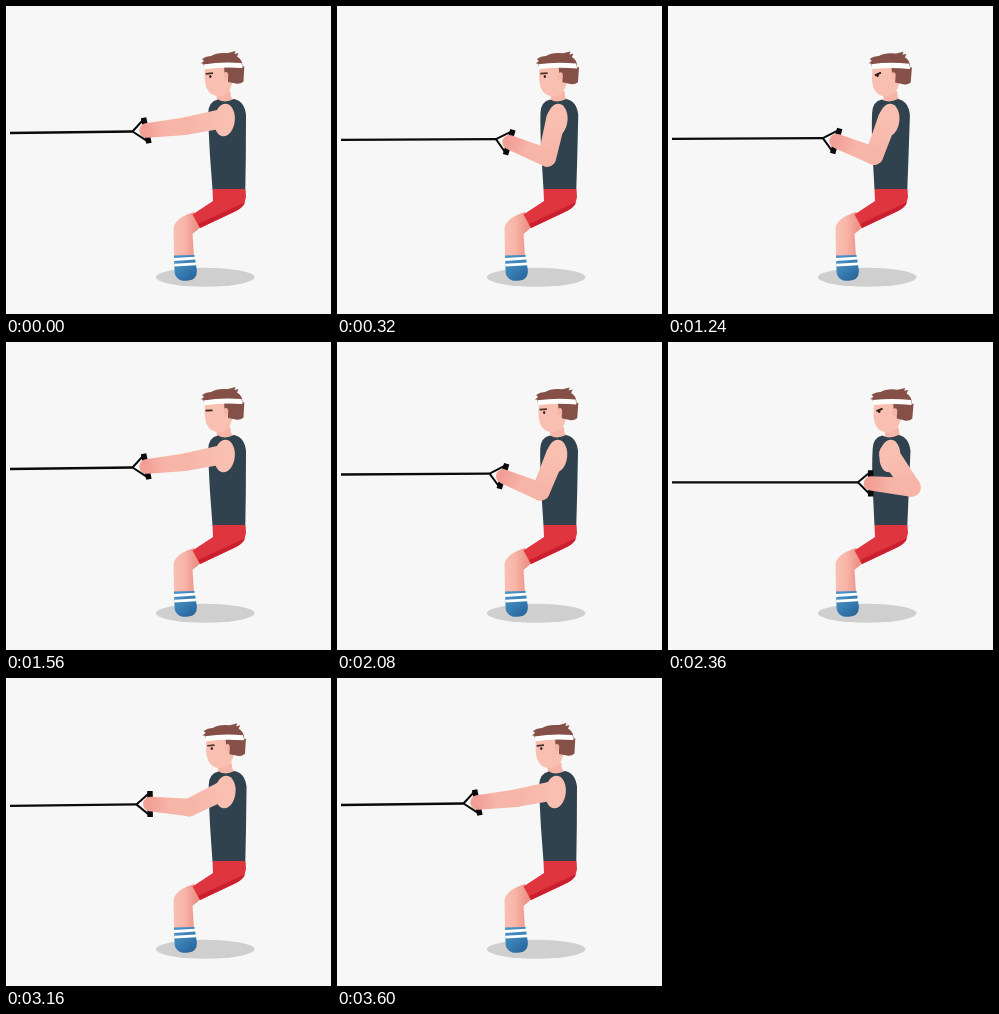
An HTML page with a canvas for the animation above (4.8 s loop, 325 px wide and 308 px high).

```html
<!DOCTYPE html>
<html lang="en">
<head>
<meta charset="utf-8">
<title>Cable row</title>
<style>
html, body { margin: 0; width: 100%; height: 100%; overflow: hidden; background: #f7f7f7; }
canvas { display: block; width: 325px; height: 308px; }
</style>
</head>
<body>
<canvas id="stage"></canvas>
<script>
const W = 325, H = 308, LOOP = 4800, REP = 1800, STEP = 40;
const SKIN = '#f9c0b2', ROSE = '#f7b5a8', PINK = '#f2a096', RED = '#de353e', SHIRT = '#30424e',
      HAIR = '#845047', BLACK = '#0a0a0a';
const cv = document.getElementById('stage'), c = cv.getContext('2d');
const dpr = window.devicePixelRatio || 1;
cv.width = W * dpr;
cv.height = H * dpr;

const clamp = x => Math.min(1, Math.max(0, x));
const mix = (a, b, k) => a + (b - a) * k;
const ease = x => (1 - Math.cos(Math.PI * clamp(x))) / 2;
const release = x => ease(1 - Math.pow(1 - clamp(x), 1.55));

// 0 = arm stretched, 1 = fully pulled
const pulled = (t, back) => t < back ? ease(t / 650) : 1 - release((t - back) / 400);

function fill(path, color) {
  c.fillStyle = color;
  c.fill(new Path2D(path));
}

function line(points, width, color = BLACK) {
  c.beginPath();
  points.forEach(([x, y]) => c.lineTo(x, y));
  c.strokeStyle = color;
  c.lineWidth = width;
  c.stroke();
}

function oval(x, y, rx, ry, color, turn = 0) {
  c.beginPath();
  c.ellipse(x, y, rx, ry, turn, 0, 7);
  c.fillStyle = color;
  c.fill();
}

function fade(a, b, ...stops) {
  const g = c.createLinearGradient(...a, ...b);
  stops.forEach((s, i) => g.addColorStop(i / (stops.length - 1), s));
  return g;
}

// limb with round ends of different radius
function limb(a, b, ra, rb, color) {
  const ang = Math.atan2(b[1] - a[1], b[0] - a[0]), q = Math.PI / 2;
  c.beginPath();
  c.arc(...a, ra, ang + q, ang - q);
  c.arc(...b, rb, ang - q, ang + q);
  c.fillStyle = color;
  c.fill();
}

// elbow hangs below the line from shoulder to wrist
function elbowOf(s, w, len) {
  const dx = w[0] - s[0], dy = w[1] - s[1], d = Math.hypot(dx, dy);
  const h = Math.sqrt(Math.max(0, len * len - d * d / 4));
  return [(s[0] + w[0]) / 2 + dy / d * h, (s[1] + w[1]) / 2 - dx / d * h];
}

function legs() {
  oval(199.2, 271.2, 49.2, 9.5, '#cfcfcf');
  fill('M188 206Q169 212 167.500 222L168 251H188L186.500 228L196 220Z',
    fade([167, 0], [190, 0], SKIN, ROSE, '#ee9287'));
  fill('M168 249.500L188.500 249L190.800 264Q191.500 274.500 180 274.800Q168.500 275 168.500 264Z',
    fade([170, 250], [188, 274], '#4a93c8', '#3a80b5', '#28639a'));
  line([[168, 253.5], [189.2, 252.2]], 2.8, '#fff');
  line([[168.3, 259.2], [190, 257.8]], 2.8, '#fff');
}

function shorts() {
  fill('M206.500 183H239.500L240 191Q239 200 230 205L194 222L186.500 208.500L207 195Z', RED);
  fill('M194 222L192 218L239.300 196Q237 202 230 205Z', '#cb1f30');
}

function torso(k) {
  const x = v => v + 2.6 * k;
  fill(`M206.500 183.500L${204 + .9 * k} 150Q${202.4 + 1.3 * k} 122 ${x(202.2)} 107
    Q${x(202.5)} 95.500 ${x(212)} 93.500Q${x(219)} 97.500 ${x(228)} 93
    Q${x(238.5)} 95 ${x(240)} 109L${239.8 + k} 150L239.300 183.500Z`, SHIRT);
}

function head(k, closed) {
  c.save();
  c.translate(218 + 6.5 * k, 92.6 + .4 * k);
  c.rotate(.035 * k);
  c.translate(-218, -92);
  fill('M210 84H224L225 90Q226 93 230 93.500Q220 99 211 94Z', ROSE);
  fill('M198.700 60V73Q200 89 212.500 89.500Q223 89.500 226 77V60Z', SKIN);
  fill('M218 60H238.300L237.500 75Q234 78 230 77L222 75.500V71L218.500 66Z', HAIR);
  oval(220, 69, 2.3, 3.7, ROSE);
  fill('M197 57L194.800 57L198 54.500L196 52.500Q200 49.500 205 49.500Q211 45.500 222 46.500L229.500 44.500L228.500 47.500L232.500 46.500L231 50Q236.500 53 236.500 60H198Z', HAIR);
  fill('M197.600 57.800Q216 54.800 235.500 56.500L236.500 61.500Q217 60 198.500 62.600Z', '#fff');
  if (closed) {
    line([[199.5, 68], [206.5, 67.8]], 1.7, '#3a2723');
  } else if (k > .6) {
    line([[201.5, 68.8], [207.5, 66]], 1.9, '#2d1c1a');
    oval(204.3, 69, 1.3, 1.5, '#2d1c1a');
  } else {
    line([[199.7, 67.2], [207, 66.6]], 1.7, '#4a302a');
    oval(204.3, 70, 1.2, 1.4, '#2d1c1a');
  }
  c.restore();
}

function armAndCable(p, k) {
  const s = [mix(217.5, 221, k), mix(112.5, 111.5, k)];
  const w = [mix(140.5, 206, p), 124.5 + 17 * Math.sin(p * Math.PI / 2)];
  const e = elbowOf(s, w, mix(39, 40.6, ease(p * 2)));
  const apex = [mix(126.5, 193, p), mix(125.5, 141, p)];
  const len = Math.hypot(w[0] - e[0], w[1] - e[1]);
  const ux = (w[0] - e[0]) / len, uy = (w[1] - e[1]) / len;
  const grip = (along, side) => [w[0] + ux * along - uy * side, w[1] + uy * along + ux * side];
  const top = grip(2, 11), low = grip(0, -11);

  line([[4, mix(127, 141, p)], apex], 2.3);
  c.lineJoin = 'round';
  line([grip(1.5, 13), grip(-1, -13)], 5.5);

  oval(s[0] + 1, 114, 10.3, 16.3, SKIN, .1);
  const r = mix(8.8, 9.4, p);
  limb(s, e, 9.8, r, fade(s, e, SKIN, ROSE));
  limb(e, w, r, 7.2, fade(e, w, ROSE, ROSE, PINK));
  line([top, apex, low], 2);
}

function draw(time) {
  const t = Math.floor(time % LOOP / STEP) * STEP;
  const ph = t < 2 * REP ? t % REP : 0;
  const p = pulled(ph, 1080), k = pulled(ph, 1145);
  c.setTransform(dpr, 0, 0, dpr, 0, 0);
  c.fillStyle = '#f7f7f7';
  c.fillRect(0, 0, W, H);
  legs();
  head(k, ph >= 1480 && ph < 1640);
  torso(k);
  shorts();
  armAndCable(p, k);
}

const start = performance.now();
function tick() {
  draw(performance.now() - start);
  requestAnimationFrame(tick);
}
tick();
</script>
</body>
</html>
```
